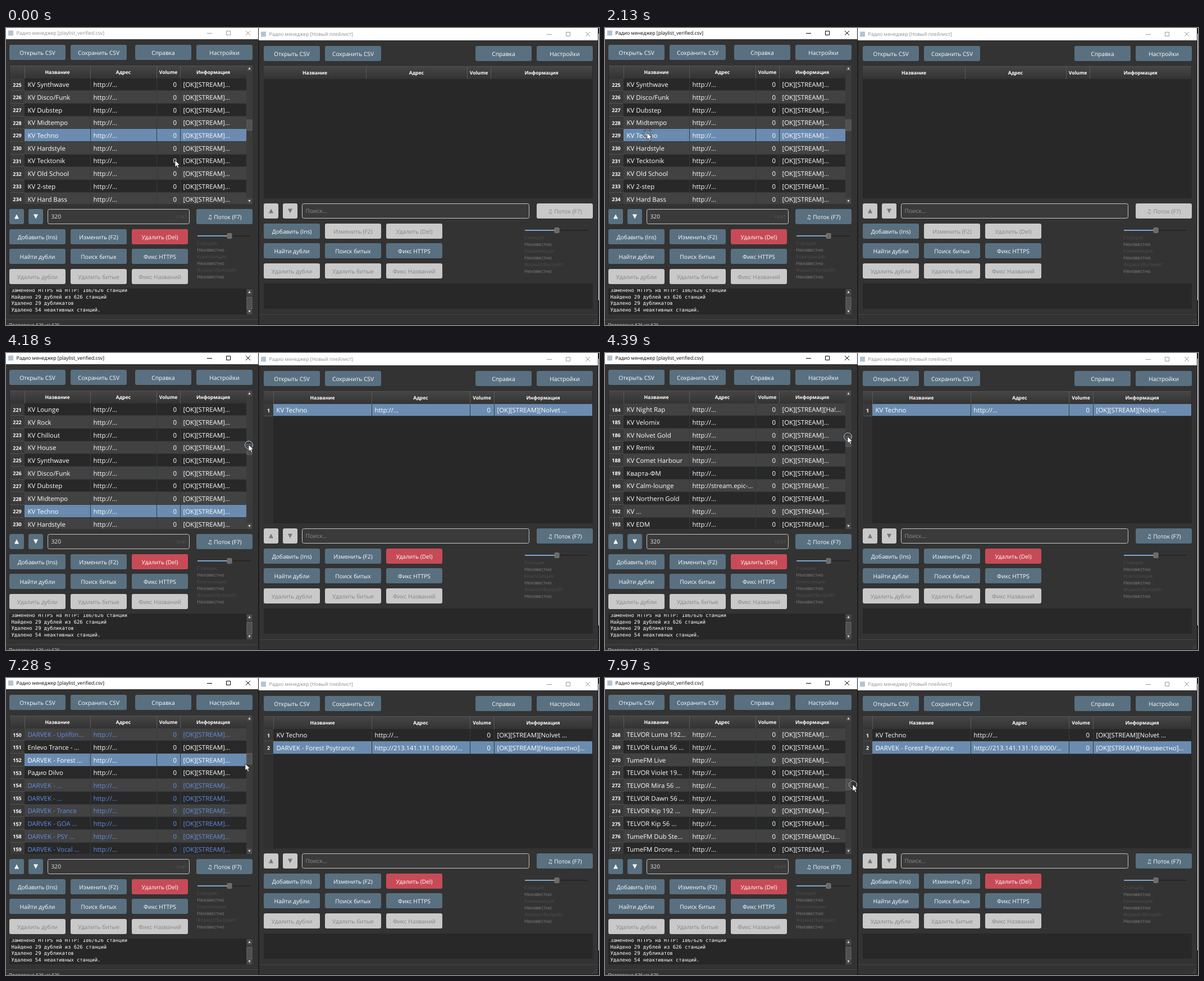
These frames come from a looping animation (1056 by 530 pixels, 8 s). An HTML page with a canvas:

```html
<!DOCTYPE html>
<html lang="ru">
<head>
<meta charset="utf-8">
<title>Радио менеджер</title>
<style>
html, body { margin: 0; width: 100%; height: 100%; overflow: hidden; background: #333; }
canvas { display: block; }
</style>
</head>
<body>
<canvas id="stage" width="1056" height="530"></canvas>
<script>
const ctx = document.getElementById('stage').getContext('2d');
const LOOP = 8000, ROW = 22.7, STEP = 0.39;
const SANS = '"Open Sans", "Noto Sans", "DejaVu Sans", sans-serif';
const MONO = '"DejaVu Sans Mono", monospace';
const BLUE = '#597080', RED = '#c74b56', OFF = '#c9c9c9', SEL = '#6b8cb0', LINK = '#628fe6', GRID = '#343a40';

// Station names by table position
const names = {};
const put = (first, list) => list.forEach((s, i) => { names[first + i] = s; });
put(150, ['DARVEK - Upliftin...', 'Enlevo Trance - ...', 'DARVEK - Forest ...', 'Радио Dilvo', 'DARVEK - ...',
  'DARVEK - ...', 'DARVEK - Trance', 'DARVEK - GOA ...', 'DARVEK - PSY ...', 'DARVEK - Vocal ...']);
put(184, ['KV Night Rap', 'KV Velomix', 'KV Nolvet Gold', 'KV Remix', 'KV Comet Harbour', 'Кварта-ФМ',
  'KV Calm-lounge', 'KV Northern Gold', 'KV ...', 'KV EDM']);
put(225, ['KV Synthwave', 'KV Disco/Funk', 'KV Dubstep', 'KV Midtempo', 'KV Techno', 'KV Hardstyle',
  'KV Tecktonik', 'KV Old School', 'KV 2-step', 'KV Hard Bass']);
put(268, ['TELVOR Luma 192...', 'TELVOR Luma 56 ...', 'TumeFM Live', 'TELVOR Violet 19...', 'TELVOR Mira 56 ...',
  'TELVOR Dawn 56 ...', 'TELVOR Kip 192 ...', 'TELVOR Kip 56 ...', 'TumeFM Dub Ste...', 'TumeFM Drone ...']);
const genres = ['House', 'Ambient', 'Chillout', 'Breaks', 'Rock', 'Jungle', 'Lounge'];

function station(n) {
  const g = genres[n * 5 % 7];
  return names[n] || (n < 180 ? 'DARVEK - ' + g : n < 250 ? 'KV ' + g : 'TELVOR ' + g);
}
function info(n) {
  return '[OK][STREAM]' + (n === 184 ? '[Ha!...' : n === 276 ? '[Du...' : '...');
}

// Pointer path: time, x, y
const path = [
  [0, 301, 236], [150, 301, 236], [650, 135, 179], [950, 88, 194], [1200, 88, 194], [1440, 79, 190],
  [1650, 79, 190], [1950, 75, 187], [2130, 75, 187], [2750, 556, 182], [3590, 556, 182],
  [4150, 432, 165], [4390, 432, 149], [4540, 430, 135.8], [4720, 430, 135.8], [5000, 270, 121],
  [5470, 99, 148], [5590, 106, 147], [5640, 106, 147], [6240, 544, 192], [7040, 544, 192],
  [7280, 426, 153], [7550, 433, 144], [7730, 433, 144], [7970, 441, 190], [8000, 441, 190]
];
const slope = (i, d) => (path[i + 1][d] - path[i][d]) / (path[i + 1][0] - path[i][0]);
function tangent(i, d) {
  if (i === 0 || i === path.length - 1) return 0;
  const a = slope(i - 1, d), b = slope(i, d);
  return a * b <= 0 ? 0 : 2 * a * b / (a + b);
}
function along(t, d) {
  let i = 0;
  while (i < path.length - 2 && t >= path[i + 1][0]) i++;
  const a = path[i], b = path[i + 1], h = b[0] - a[0], u = (t - a[0]) / h, v = 1 - u;
  return a[d] * (1 + 2 * u) * v * v + b[d] * u * u * (3 - 2 * u)
    + h * u * v * (tangent(i, d) * v - tangent(i + 1, d) * u);
}
const within = (t, a, b) => t >= a && t < b;

function topRow(t, y) {
  if (t < 4150) return 225;
  if (t < 4540) return Math.round(225 + (y - 165) / STEP);
  if (t < 7730) return 150;
  return Math.round(150 + (y - 144) / STEP);
}

function box(x, y, w, h, fill) {
  ctx.fillStyle = fill;
  ctx.fillRect(x, y, w, h);
}
function text(s, x, cy, size, color, align = 'left', weight = 400, face = SANS) {
  ctx.font = `${weight} ${size}px ${face}`;
  ctx.fillStyle = color;
  ctx.textAlign = align;
  ctx.fillText(s, x, cy + size * 0.36);
}
function poly(fill, ...p) {
  ctx.beginPath();
  for (let i = 0; i < p.length; i += 2) ctx.lineTo(p[i], p[i + 1]);
  ctx.closePath();
  ctx.fillStyle = fill;
  ctx.fill();
}
function arrow(x, y, r, dir, color) {
  poly(color, x - r, y + r * dir, x + r, y + r * dir, x, y - r * dir);
}
function clipped(x, y, w, h, draw) {
  ctx.save();
  ctx.beginPath();
  ctx.rect(x, y, w, h);
  ctx.clip();
  draw();
  ctx.restore();
}
function plate(x, y, w, fill) {
  ctx.beginPath();
  ctx.roundRect(x, y, w, 27, 3);
  ctx.fillStyle = fill;
  ctx.fill();
}
function button(s, x, y, fill = BLUE) {
  plate(x, y, 100, fill);
  text(s, x + 50, y + 13.9, 10.2, fill === OFF ? '#858585' : '#fff', 'center');
}

function titleBar(x, right, height, cy, s, active) {
  const ink = active ? '#000' : '#999';
  box(x, 0, right - x, height, '#fff');
  box(x + 4, cy - 4.5, 9, 9, '#b4c4d0');
  text(s, x + 18.5, cy + 0.3, 8.7, active ? '#000' : '#8c8c8c');
  ctx.strokeStyle = ink;
  ctx.lineWidth = 1;
  ctx.beginPath();
  ctx.moveTo(right - 91, cy + 0.5);
  ctx.lineTo(right - 82, cy + 0.5);
  ctx.rect(right - 56.5, cy - 3.5, 7, 7);
  ctx.moveTo(right - 22, cy - 4);
  ctx.lineTo(right - 14, cy + 4);
  ctx.moveTo(right - 14, cy - 4);
  ctx.lineTo(right - 22, cy + 4);
  ctx.stroke();
}

function header(x, y, right, cols) {
  const g = ctx.createLinearGradient(0, y, 0, y + 23);
  g.addColorStop(0, '#464646');
  g.addColorStop(1, '#333');
  box(x, y, right - x, 23, g);
  box(x, y, right - x, 1, '#505050');
  ['Название', 'Адрес', 'Volume', 'Информация'].forEach((s, i) => {
    text(s, (cols[i] + cols[i + 1]) / 2, y + 12, 8.6, '#fff', 'center', 700);
    if (cols[i] > x) box(cols[i], y, 1, 23, '#5a5a5a');
  });
}

function row(n, x, top, cols, values, color, fill) {
  const y = Math.round(top), h = Math.round(top + ROW) - y, cy = top + ROW / 2 + 0.3;
  box(x, y, cols[0] - x, h, '#3a3a3a');
  box(x, y + h - 1, cols[0] - x, 1, '#505050');
  text(n, (x + cols[0]) / 2, cy + 0.3, 9, '#fff', 'center', 700);
  box(cols[0], y, cols[4] - cols[0], h, GRID);
  box(cols[0], y, cols[4] - cols[0], h - 1, fill);
  for (let i = 0; i < 4; i++) {
    if (i) box(cols[i], y, 1, h, GRID);
    if (i === 2) text(values[i], cols[3] - 6, cy, 11.4, color, 'right');
    else text(values[i], cols[i] + 5.5, cy, 11.4, color);
  }
}

function scrollBar(y, h, knob, size) {
  box(428, y, 11, h, '#3b3b3b');
  for (const [by, dir] of [[y, 1], [y + h - 10, -1]]) {
    box(429, by, 9, 10, '#4a4a4a');
    arrow(433.5, by + 5, 2, dir, '#e0e0e0');
  }
  box(428.5, knob, 10, size, '#646464');
  box(429.5, knob + 1, 8, size - 2, '#505050');
}

function leftTable(t, top) {
  const cols = [33, 150, 268, 310, 428], selected = t < 5530 ? 229 : 152;
  box(6, 67, 433, 247, '#282828');
  header(7, 67, 428, cols);
  clipped(6, 90, 422, 224, () => {
    for (let i = 0; i < 10; i++) {
      const n = top + i, y = 89.5 + i * ROW, s = station(n), on = n === selected;
      const color = s.startsWith('DARVEK') && !on ? LINK : '#fff';
      const url = n === 190 ? 'http://stream.epic-...' : 'http://...';
      row(n, 7, y, cols, [s, url, '0', info(n)], color, on ? SEL : n % 2 ? '#282828' : '#424242');
      if (on && t >= 2130) {
        ctx.strokeStyle = '#59799c';
        ctx.lineWidth = 1;
        ctx.setLineDash([1, 1]);
        ctx.strokeRect(36.5, Math.round(y) + 3.5, 111, 15);
        ctx.setLineDash([]);
      }
    }
  });
  scrollBar(67, 247, 76 + STEP * (top - 1), 20);
}

function rightTable(t) {
  const count = t < 3090 ? 0 : t < 6550 ? 1 : 2;
  const cols = count ? [476, 651, 826, 869, 1044] : [459, 641, 821, 863, 1044];
  box(459, 68, 586, 236, '#282828');
  header(459, 68, 1044, cols);
  if (count) box(459, 91, 17, 213, '#303030');
  const rows = [
    ['KV Techno', 'http://...', '0', '[OK][STREAM][Nolvet ...'],
    ['DARVEK - Forest Psytrance', 'http://213.141.131.10:8000/...', '0', '[OK][STREAM][Неизвестно]...']
  ];
  for (let i = 0; i < count; i++)
    row(i + 1, 459, 90.6 + i * ROW, cols, rows[i], '#fff', i === count - 1 ? SEL : '#282828');
}

// Search line, buttons, slider and station details below a table
function controls(x, y, right, flowX, side, slide, search, lit) {
  [[x, 1], [x + 34, -1]].forEach(([bx, dir]) => {
    plate(bx, y, 26, lit.move ? BLUE : OFF);
    arrow(bx + 13, y + 13.5, 4, dir, lit.move ? '#fff' : '#777');
  });
  ctx.beginPath();
  ctx.roundRect(x + 68.5, y + 0.5, right - x - 69, 26, 3);
  ctx.fillStyle = '#3a3a3a';
  ctx.fill();
  ctx.strokeStyle = '#c4c4c4';
  ctx.lineWidth = 1;
  ctx.stroke();
  text(search || 'Поиск...', x + 74.5, y + 13.8, 10.2, search ? '#e8e8e8' : '#8e8e8e');
  if (search) text('15/47', right - 5, y + 13.8, 8, '#5c5c5c', 'right');
  button('♫ Поток (F7)', flowX, y, lit.edit ? BLUE : OFF);

  const labels = [
    ['Добавить (Ins)', 'Изменить (F2)', 'Удалить (Del)'],
    ['Найти дубли', 'Поиск битых', 'Фикс HTTPS'],
    ['Удалить дубли', 'Удалить битые', 'Фикс Названий']
  ];
  labels.forEach((line, r) => line.forEach((s, c) => {
    const fill = r === 2 ? OFF : r || !c ? BLUE : !lit.edit ? OFF : c === 2 ? RED : BLUE;
    button(s, x + c * 109, y + 36 + Math.round(r * 35.4), fill);
  }));

  const sy = y + 48, knob = side + slide[0];
  box(side + 1, sy - 1, slide[1], 2, '#262626');
  box(side + 1, sy - 1, slide[0], 2, '#7ea6cf');
  ctx.beginPath();
  ctx.roundRect(knob - 3, sy - 4.5, 8, 9, 1.5);
  ctx.fillStyle = '#6a6a6a';
  ctx.fill();
  ctx.strokeStyle = '#7c7c7c';
  ctx.stroke();
  ['Станция:', 'Композиция:', 'Формат/Битрейт:'].forEach((s, i) => {
    text(s, side, y + 61 + i * 24, 8.5, '#4e4e4e');
    text('Неизвестно', side, y + 73 + i * 24, 8.5, '#808080');
  });
}

function leftWindow(t, top) {
  box(0, 0, 449, 530, '#333');
  titleBar(0, 449, 20, 9, 'Радио менеджер [playlist_verified.csv]', t >= 2130);
  button('Открыть CSV', 6, 30);
  button('Сохранить CSV', 115, 30);
  button('Справка', 230, 30);
  button('Настройки', 339, 30);
  leftTable(t, top);
  controls(6, 323, 327, 339, 340, [57, 95], '320', { move: true, edit: true });
  box(6, 465, 433, 46, '#272727');
  clipped(6, 466, 422, 45, () => {
    ['Заменено HTTPS на HTTP: 186/626 станции', 'Найдено 29 дублей из 626 станций',
      'Удалено 29 дубликатов', 'Удалено 54 неактивных станций.'].forEach((s, i) =>
      text(s, 9.5, 468 + i * 11.5, 8.8, '#fff', 'left', 400, MONO));
  });
  scrollBar(466, 45, 480, 22);
  box(0, 520, 449, 1, '#464646');
  text('Проверено 626 из 626', 5, 529.5, 8.4, '#ddd');
}

function rightWindow(t) {
  box(449, 0, 607, 530, '#1d1d1d');
  box(1055, 10, 1, 476, '#fff');
  box(451, 0, 603, 529, '#333');
  titleBar(450, 1054, 22, 11, 'Радио менеджер [Новый плейлист]', false);
  button('Открыть CSV', 459, 32);
  button('Сохранить CSV', 568, 32);
  button('Справка', 836, 32);
  button('Настройки', 945, 32);
  rightTable(t);
  controls(459, 313, 932, 945, 923, [57, 112], '', { move: false, edit: t >= 3090 });
  box(459, 456, 586, 45, '#282828');
  box(451, 511, 603, 1, '#464646');
  for (let i = 0; i < 3; i++)
    for (let j = 0; j <= i; j++) box(1051 - j * 3, 520 + i * 3, 1, 1, '#777');
}

function pointer(t, x, y) {
  const drag = within(t, 2190, 3090) || within(t, 5640, 6550);
  const down = drag || within(t, 2130, 2190) || within(t, 4150, 4540) || within(t, 5530, 5640) || t >= 7730;
  if (down) {
    ctx.beginPath();
    ctx.arc(x + 0.5, y + 0.5, 7, 0, Math.PI * 2);
    ctx.strokeStyle = '#1b2632';
    ctx.lineWidth = 2.4;
    ctx.stroke();
    ctx.strokeStyle = '#e8edf2';
    ctx.lineWidth = 1;
    ctx.stroke();
  }
  if (drag) {
    ctx.strokeStyle = '#ddd';
    ctx.lineWidth = 1;
    ctx.setLineDash([1, 1]);
    ctx.strokeRect(x + 3.5, y + 16.5, 11, 5);
    ctx.setLineDash([]);
  }
  ctx.save();
  ctx.translate(x, y);
  poly('#fff', 0, 0, 0, 12, 2.8, 9.5, 4.8, 14, 6.8, 13.1, 4.9, 8.8, 8.6, 8.6);
  ctx.strokeStyle = '#111';
  ctx.lineWidth = 0.7;
  ctx.stroke();
  ctx.restore();
}

function draw(now) {
  const t = now % LOOP, x = along(t, 1), y = along(t, 2);
  ctx.textRendering = 'geometricPrecision';
  leftWindow(t, topRow(t, y));
  rightWindow(t);
  pointer(t, x, y);
}

let start;
function tick(now) {
  if (start === undefined) start = now;
  draw(now - start);
  requestAnimationFrame(tick);
}
requestAnimationFrame(tick);
</script>
</body>
</html>
```
